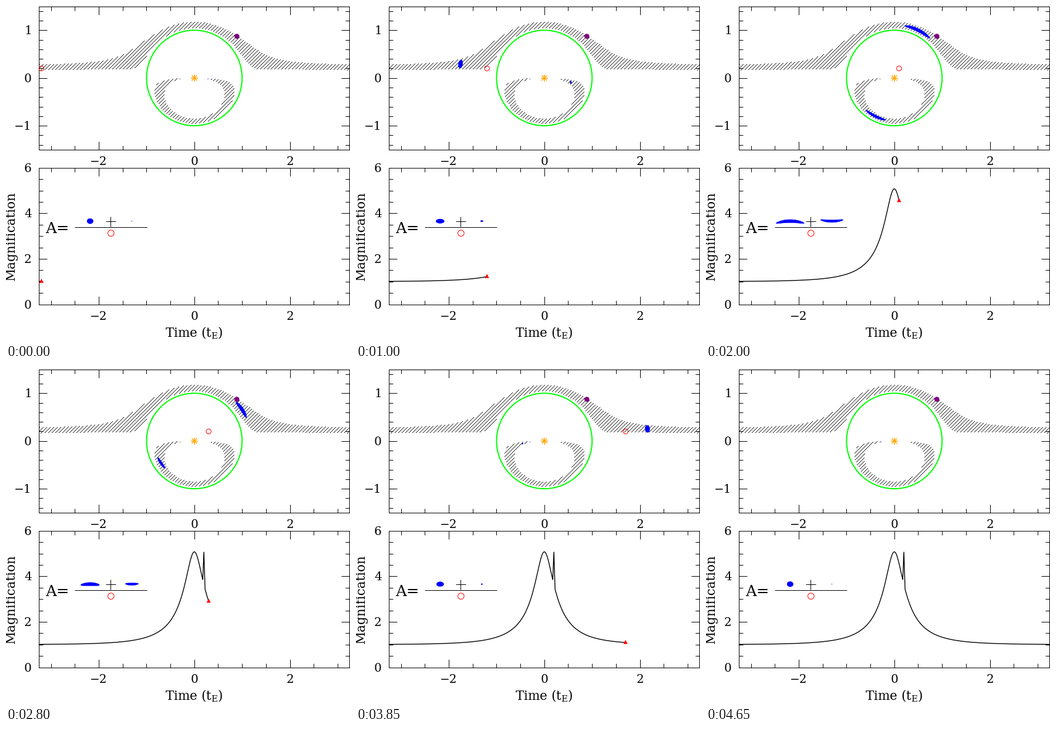
A matplotlib script that plays this animation: 586 by 571 pixels, repeating every 4700 ms.

```python
import numpy as np
import matplotlib.pyplot as plt
from matplotlib.animation import FuncAnimation
from matplotlib.collections import LineCollection
from matplotlib.patches import Circle, Polygon, Rectangle

W, H, DPI = 586, 571, 64
PX = 72 / DPI                          # one pixel in points
LEFT, RIGHT = 56, 585
UNIT = (RIGHT - LEFT) / 6.5            # pixels per Einstein radius
IMPACT, RHO = 0.2, 0.059               # impact parameter, source radius

plt.rcParams.update({"font.family": "DejaVu Serif", "mathtext.fontset": "dejavuserif"})


def X(v):
    return 320.5 + UNIT * v


def Y(v):
    return 122 - UNIT * v


def M(v):
    return 508 - 233 / 6 * v


fig = plt.figure(figsize=(W / DPI, H / DPI), dpi=DPI, facecolor="white")
ax = fig.add_axes([0, 0, 1, 1])
# whole coordinates fall safely inside their pixel
ax.set(xlim=(-0.3, W - 0.3), ylim=(H - 0.7, -0.7), autoscale_on=False)
ax.axis("off")


# ---------- drawing helpers ----------
def draw(segments, lw=1.0, color="black", z=2):
    ax.add_collection(LineCollection(segments, linewidths=lw * PX, colors=color, zorder=z),
                      autolim=False)


def write(s, x, y, size=20, **kw):
    kw = {"ha": "center", "va": "baseline"} | kw
    ax.text(x, y, s, size=size * PX, **kw)


def outline(x, y, r, color, lw, z):
    return ax.add_patch(Circle((x, y), r, fill=False, ec=color, lw=lw * PX, zorder=z))


def blob(color, lw, z, clip=None):
    p = ax.add_patch(Polygon(np.zeros((3, 2)), fc=color, ec=color, lw=lw * PX, zorder=z))
    if clip is not None:
        p.set_clip_path(clip)
    return p


def label(v):
    return str(v).replace("-", "\u2212")


def panel(top, bottom, fy, limits, minor, major):
    """Box with inward ticks; every whole multiple of major is long and labelled."""
    corners = [(LEFT, top), (RIGHT, top), (RIGHT, bottom), (LEFT, bottom), (LEFT, top)]
    draw([corners])
    for i in range(-6, 7):
        x, n = X(i / 2), 7 if i % 4 else 14
        draw([[(x, top), (x, top + n)], [(x, bottom), (x, bottom - n)]])
        if i % 4 == 0:
            write(label(i // 2), x, bottom + 26)
    per = round(major / minor)
    for i in range(round(limits[0] / minor), round(limits[1] / minor) + 1):
        y, n = fy(i * minor), 7 if i % per else 14
        draw([[(LEFT, y), (LEFT + n, y)], [(RIGHT, y), (RIGHT - n, y)]])
        if i % per == 0:
            write(label(i // per * major), 43.5, y + 7, ha="right")


panel(0, 244, Y, (-1.4, 1.4), 0.2, 1)
panel(275, 508, M, (0, 6), 0.5, 2)
write(r"Time (t$_\mathregular{E}$)", 320.5, 564, 21.5)
write("Magnification", 15, 391.5, 21.5, rotation=90, rotation_mode="anchor")


# ---------- hatched zone around the image tracks ----------
def in_zone(x, y):
    r = np.hypot(x, y) + 1e-6
    k = 1 - 1 / r**2                   # lens equation: source = k * image
    half = 0.056 + 0.066 * np.exp(-np.maximum(0, r - 1.35) / 0.35)
    return (np.abs(y * k - IMPACT) < half) & ((r > 1) | (np.abs(x * k) < 3))


gx, gy = np.meshgrid(np.arange(LEFT + 1, RIGHT), np.arange(1, 244))
hatch = ((gx + gy) % 6 == 0) & in_zone((gx - X(0)) / UNIT, (Y(0) - gy) / UNIT)
ax.plot(gx[hatch], gy[hatch], ",", color="black", zorder=1)

# ---------- lens, planet and the fraction ----------
outline(X(0), Y(0), UNIT, "#00ff00", 2, 3)
spokes = [6.2 * np.array([np.cos(a), np.sin(a)]) for a in np.arange(4) * np.pi / 4]
draw([[(X(0), Y(0)) - s, (X(0), Y(0)) + s] for s in spokes], 1.5, "orange", 4)
ax.add_patch(Circle((X(0.89), Y(0.873)), 4.3, fc="purple", lw=0, zorder=7))

write("A=", 67, 386, 26, ha="left")
draw([[(117, 376), (240, 376)], [(170, 366), (187, 366)], [(178, 358), (178, 375)]])
outline(178.5, 386.5, 5.3, "red", 1, 4)

# ---------- moving parts ----------
sky = Rectangle((LEFT, 0), RIGHT - LEFT, 244, transform=ax.transData)
images = [blob("blue", 0.5, 5, sky) for _ in range(2)]
samples = [blob("blue", 0.5, 5) for _ in range(2)]
marker = blob("red", 0, 6)
source = outline(0, 0, 4.2, "red", 1, 6)
curve, = ax.plot([], [], color="black", lw=1.4 * PX, zorder=4)

TIMES = np.linspace(-3.25, 3.25, 2601)
RIM = RHO * np.exp(1j * np.linspace(0, 2 * np.pi, 90))


def magnify(t):
    u2 = t * t + IMPACT**2
    spike = 1.42 * np.maximum(0, 1 - np.abs(t - 0.2) / 0.024)
    return (u2 + 2) / np.sqrt(u2 * (u2 + 4)) + spike


def lens(beta, sign):
    u = np.abs(beta)
    return beta / u * (u + sign * np.sqrt(u * u + 4)) / 2


def step(n):
    """One step per tick, but eight ticks per step near the peak."""
    if n < 32:
        return n
    return 32 + (n - 32) // 8 if n < 64 else n - 28


def update(n):
    t = round(-3.2 + 0.1 * step(n), 1)
    centre = t + 1j * IMPACT
    upright = 1j * np.conj(centre) / abs(centre)
    for sign, image, sample, x0 in zip((1, -1), images, samples, (143, 214)):
        z = lens(centre + RIM, sign)
        image.set_xy(np.column_stack([X(z.real), Y(z.imag)]))
        d = (z - lens(centre, sign)) * upright * UNIT
        sample.set_xy(np.column_stack([x0 + d.real, 366 - d.imag]))

    x, y = X(t), M(magnify(t))
    source.center = x, Y(IMPACT)
    marker.set_xy([(x - 3.6, y + 2.5), (x + 3.6, y + 2.5), (x, y - 4.5)])
    for part in (source, marker):
        part.set_visible(abs(t) < 3.25)

    past = TIMES[TIMES <= t + 1e-6]
    curve.set_data(X(past), M(magnify(past)))
    return []


anim = FuncAnimation(fig, update, frames=94, interval=50, repeat=True,
                     repeat_delay=0, init_func=lambda: update(0))
plt.show()
```
